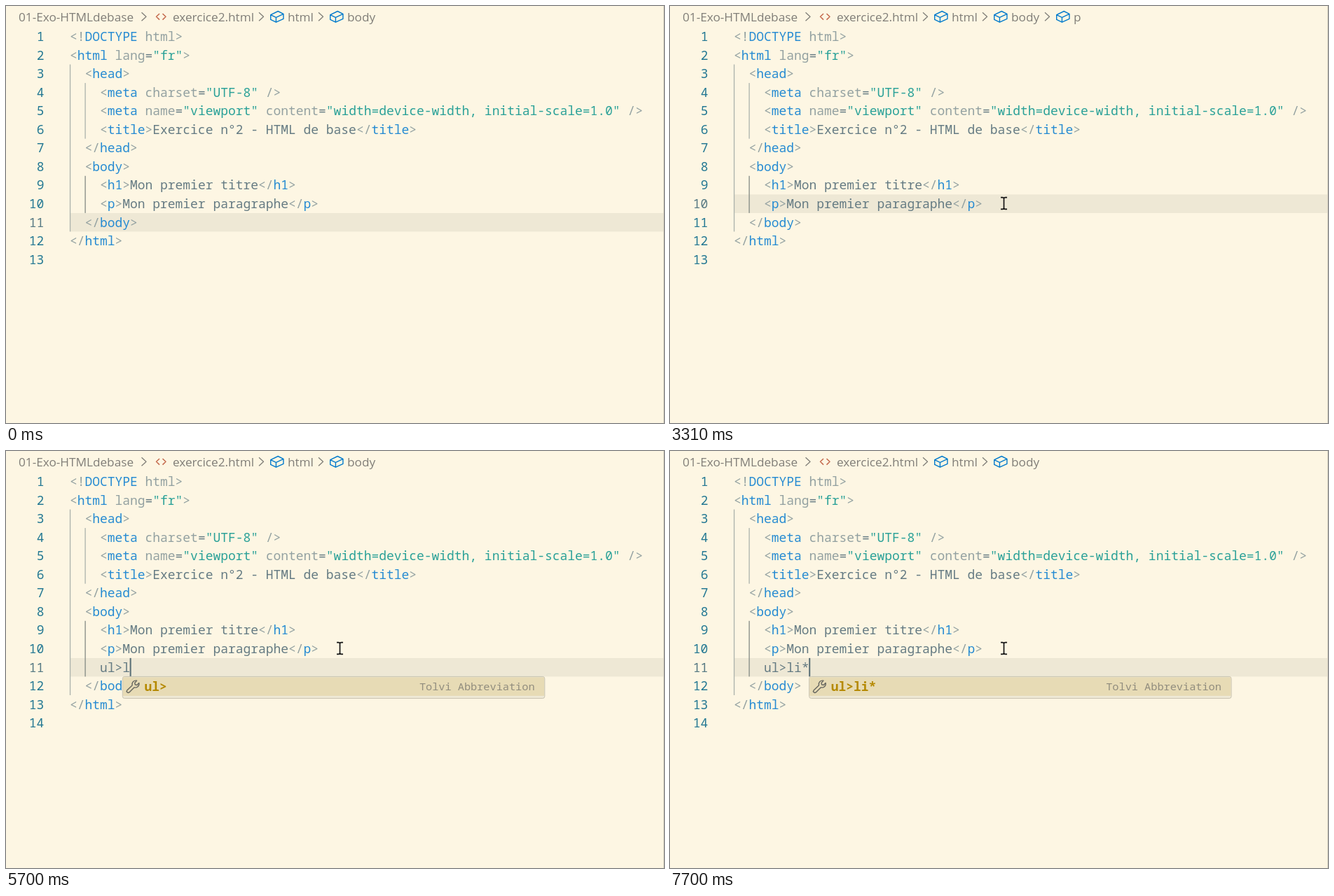
An HTML page for the animation above (8 s loop, 939 by 596 pixels).

```html
<!DOCTYPE html>
<html lang="fr">
<head>
<meta charset="UTF-8">
<title>Liste en HTML</title>
<style>
  html, body { margin: 0; width: 100%; height: 100%; overflow: hidden; background: #fdf6e3; }
  svg { display: block; width: 100vw; height: 100vh; }
  text { font-family: "Noto Sans Mono", monospace; font-size: 17.95px; white-space: pre; fill: #657b83; }
  .crumb { font-family: "Open Sans", "Noto Sans", sans-serif; font-size: 17.2px; fill: #807e78; }
  .tag { fill: #268bd2; }
  .dim { fill: #93a1a1; }
  .str { fill: #2aa198; }
  .num { fill: #237893; text-anchor: end; }
  .num.on { fill: #567983; }
  .hit { fill: #b58900; font-weight: 700; }
  .detail { font-size: 15.25px; fill: #918d7e; text-anchor: end; }
  .line { fill: none; stroke-linejoin: round; }
</style>
</head>
<body>
<svg viewBox="0 0 939 596" preserveAspectRatio="none">
  <g id="view"></g>
  <path id="mouse" class="line" stroke="#151515" stroke-width="1.7"
    d="M-4.5-8.3H-2Q0-8.3 0-6.5Q0-8.3 2-8.3H4.5M0-7V7M-4.5 8.3H-2Q0 8.3 0 6.5Q0 8.3 2 8.3H4.5"/>
</svg>
<script>
const LOOP = 8000, X0 = 90.9, CW = 10.77, LH = 26.55, TOP = 30.4;
const view = document.getElementById('view');
const mouse = document.getElementById('mouse');

const source = [
  '<!DOCTYPE html>',
  '<html lang="fr">',
  '  <head>',
  '    <meta charset="UTF-8" />',
  '    <meta name="viewport" content="width=device-width, initial-scale=1.0" />',
  '    <title>Exercice n°2 - HTML de base</title>',
  '  </head>',
  '  <body>',
  '    <h1>Mon premier titre</h1>',
  '    <p>Mon premier paragraphe</p>',
  '  </body>',
  '</html>',
  ''
];

const links = ['atom', 'css', 'favicon', 'im', 'import', 'manifest', 'mf', 'print', 'rss', 'touch']
  .map(s => 'link:' + s);
const hints = {
  'u': ['ul'],
  'ul>l': ['label', 'legend', 'li', 'link', ...links.slice(0, 6)],
  'ul>li': links
};

// Each step changes part of the editor state from its time on.
const steps = [
  [0, { row: 11, typed: null, popup: '', caret: false, inP: false }],
  [2830, { row: 10, caret: true }],
  [3060, { inP: true }],
  [3310, { caret: false }],
  [3780, { row: 11, typed: '', caret: true }],
  [4240, { caret: false, inP: false }],
  [4640, { typed: 'u', caret: true }],
  [4710, { popup: 'u' }],
  [4900, { typed: 'ul', popup: 'ul' }],
  [5370, { typed: 'ul>', popup: 'ul>' }],
  [5700, { typed: 'ul>l' }],
  [5770, { popup: 'ul>l' }],
  [5910, { typed: 'ul>li' }],
  [5980, { popup: 'ul>li' }],
  [6430, { typed: 'ul>li*', popup: 'ul>li*' }],
  [6890, { caret: false }],
  [7020, { typed: 'ul>li', popup: 'ul>li', caret: true }],
  [7500, { caret: false }],
  [7700, { typed: 'ul>li*', popup: 'ul>li*', caret: true }]
];

// Pointer path: time, x, y
const path = [
  [840, 846, 592], [1220, 686, 514], [1600, 526, 432], [1670, 502, 421],
  [1880, 345, 372], [2080, 241, 328], [2250, 312, 302],
  [2420, 413, 289], [2500, 444, 285], [2630, 476.5, 282]
];

const esc = s => s.replace(/&/g, '&amp;').replace(/</g, '&lt;').replace(/>/g, '&gt;');
const span = (cls, s) => `<tspan class="${cls}">${esc(s)}</tspan>`;
const text = (x, y, body, cls = '') => `<text x="${x}" y="${y}" class="${cls}">${body}</text>`;
const rect = (x, y, w, h, fill, more = '') =>
  `<rect x="${x}" y="${y}" width="${w}" height="${h}" fill="${fill}" ${more}/>`;
const line = (d, color, width, move = '') =>
  `<path class="line" d="${d}" stroke="${color}" stroke-width="${width}" transform="${move}"/>`;
const lineTop = n => TOP + (n - 1) * LH;
const colX = n => X0 + n * CW;

function paintTag(tag) {
  const [, open, name, attrs, close] = tag.match(/^(<[!\/]?)(\w+)(.*?)(\s?\/?>)$/);
  const rest = (attrs.match(/"[^"]*"|=|[^"=]+/g) || [])
    .map(s => s[0] === '"' ? span('str', s) : s === '=' ? s : span('dim', s)).join('');
  return span('dim', open) + span('tag', name) + rest + span('dim', close);
}

const paintCode = s => (s.match(/<[^>]*>|[^<]+/g) || [])
  .map(p => p[0] === '<' ? paintTag(p) : esc(p)).join('');

const chevron = x => line('M-3.5-6L3 0L-3.5 6', '#807e78', 1.3, `translate(${x} 15.3)`);
const cube = x => line('M1.5 6.2L9 2.5L14.5 5.2V10.2L7 13.7L1.5 11ZM1.5 6.2L7 8.8L14.5 5.2M7 8.8V13.7',
  '#007acc', 1, `translate(${x - 1.4} 4) scale(1.4)`);

function crumbs(inP) {
  const node = (x, name) => chevron(x - 12.5) + cube(x) + text(x + 25, 22, name, 'crumb');
  return text(18, 22, '01-Exo-HTMLdebase', 'crumb') + chevron(197) +
    line('M219 11L214.5 15.3L219 19.6M223.5 11L228 15.3L223.5 19.6', '#c4694c', 1.5) +
    text(238, 22, 'exercice2.html', 'crumb') +
    node(377, 'html') + node(462, 'body') + (inP ? node(551, 'p') : '');
}

function editor(s) {
  const lines = source.slice();
  if (s.typed !== null) lines.splice(10, 0, '    ' + s.typed);
  const end = lines.indexOf('  </body>') + 1;
  const guide = (col, from, to, color) =>
    rect(colX(col), lineTop(from), 1.3, (to - from + 1) * LH, color);
  let out = rect(92, lineTop(s.row), 847, LH, '#eee8d5');
  out += guide(0, 3, end, '#abb2ac') + guide(2, 4, 6, '#abb2ac') + guide(2, 9, end - 1, '#838a84');
  lines.forEach((code, i) => {
    const y = lineTop(i + 1) + 19.6;
    out += text(54.4, y, i + 1, i + 1 === s.row ? 'num on' : 'num') + text(X0, y, paintCode(code));
  });
  if (s.caret) out += rect(colX(lines[s.row - 1].length) - 0.4, lineTop(s.row), 2, LH, '#586e75');
  return out;
}

const wrench = (x, y) => line('M1.5 15.5L8.8 8.6C7.8 4.5 11 1 15.3 1.9L12.4 5L13 7.6L15.6 8.1L18.5 5.1' +
  'C19.5 9.4 15.6 12.6 11.6 11.5L4.6 18.5C2.6 20.2-.2 17.6 1.5 15.5Z', '#66665f', 1.4, `translate(${x} ${y})`);

function popup(word) {
  if (!word) return '';
  const rows = [word, ...(hints[word] || [])];
  const part = word.split('>').pop();
  const x = colX(4 + word.length), y = 323.4;
  let out = rect(x, 322.4, 602.5, rows.length * LH + 4.6, '#eee8d5', 'rx="3" stroke="#c9c3b1"');
  out += rect(x + 0.7, y, 601, LH, '#e7dbb5');
  rows.forEach((name, i) => {
    const top = y + i * LH, n = i ? part.length : name.length;
    out += wrench(x + 5, top + 3) +
      text(x + 31.2, top + 19.6, span('hit', name.slice(0, n)) + esc(name.slice(n)));
  });
  return out + text(x + 588.3, y + 18.9, 'Tolvi Abbreviation', 'detail');
}

function spline(a, b, c, d, u) {
  return b + 0.5 * u * (c - a + u * (2 * a - 5 * b + 4 * c - d + u * (3 * (b - c) + d - a)));
}

function pointer(t) {
  const last = path.length - 1;
  // The pointer is sampled about every 69 ms.
  const q = 840 + Math.floor((t - 840) / 68.8 + 0.08) * 68.8;
  if (q >= path[last][0] - 5) return path[last].slice(1);
  const i = Math.max(0, path.findIndex(p => p[0] > q) - 1);
  const [a, b, c, d] = [i - 1, i, i + 1, i + 2].map(k => path[Math.min(last, Math.max(0, k))]);
  const u = Math.max(0, (q - b[0]) / (c[0] - b[0]));
  return [1, 2].map(k => spline(a[k], b[k], c[k], d[k], u));
}

let shown = -1;
function draw(t) {
  const past = steps.filter(s => s[0] <= t);
  if (past.length !== shown) {
    shown = past.length;
    const s = Object.assign({}, ...past.map(p => p[1]));
    view.innerHTML = crumbs(s.inP) + editor(s) + popup(s.popup) + rect(938, 0, 1, 596, '#d5cfbf');
  }
  mouse.style.visibility = t < 840 ? 'hidden' : 'visible';
  if (t >= 840) mouse.setAttribute('transform', `translate(${pointer(t).join(' ')})`);
}

const start = performance.now();
function tick() {
  draw((performance.now() - start) % LOOP);
  requestAnimationFrame(tick);
}
tick();
</script>
</body>
</html>
```
